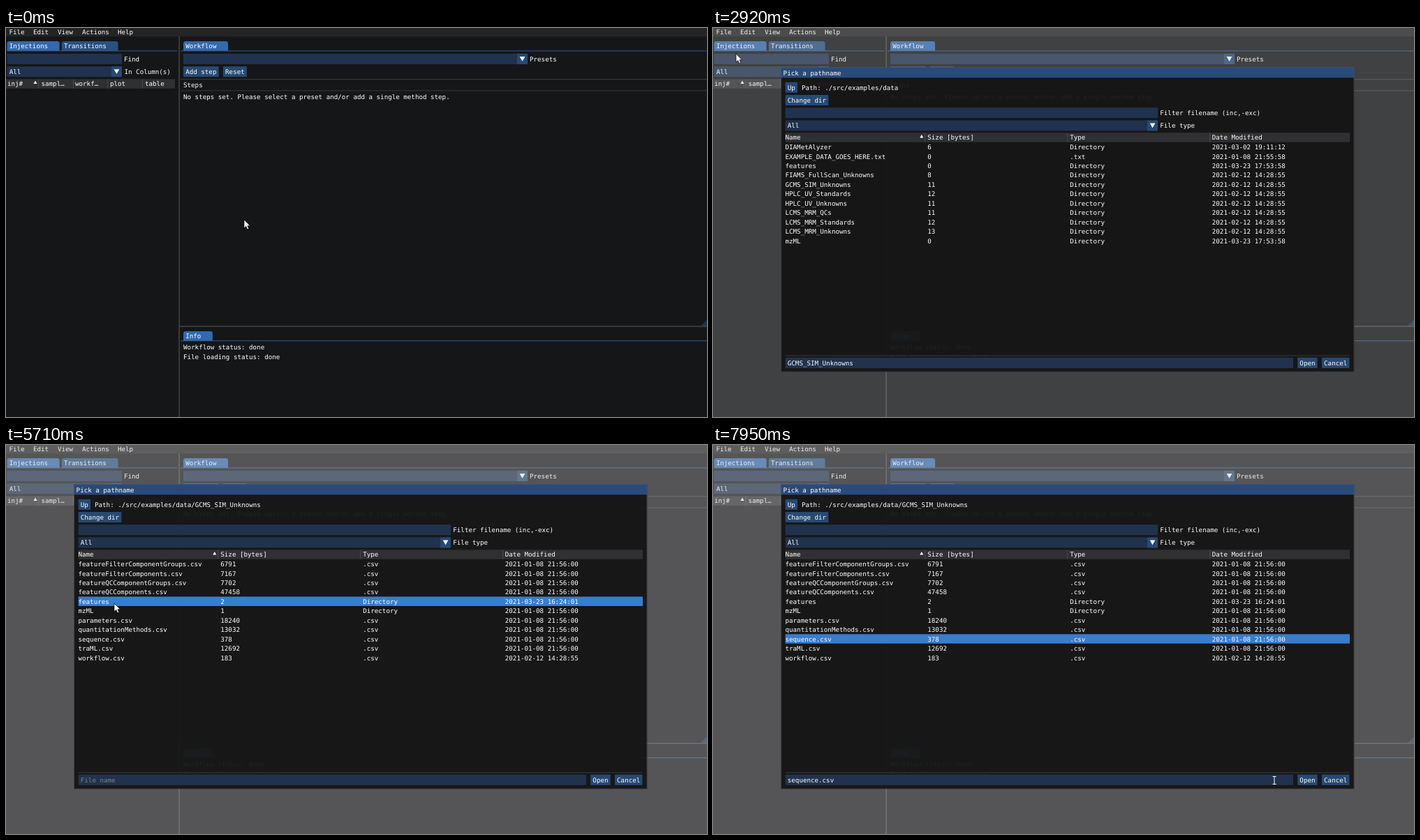
Animation, 1004 px wide and 558 px high, one loop 8 s. Source, as an HTML page:

```html
<!DOCTYPE html>
<html lang="en">
<head>
<meta charset="utf-8">
<title>Pick a pathname</title>
<style>
  html, body { margin: 0; width: 100%; height: 100%; overflow: hidden; background: #151618; }
  svg { display: block; width: 1004px; height: 558px; }
  text {
    font: 9.2px "DejaVu Sans Mono", "Liberation Mono", monospace;
    fill: #fff; white-space: pre; text-rendering: geometricPrecision;
  }
  .muted { fill: #808080; }
  .bar { fill: #242424; }
  .line { fill: #434348; }
  .rule { fill: #434348; }
  .tab, .edge { fill: #3369ad; }
  .tab-off { fill: #2a5083; }
  .field { fill: #20324d; }
  .button { fill: #274972; }
  .head { fill: #303033; }
  .split { fill: #4f4f59; }
  .hot { fill: #397dcd; }
  .press { fill: #4296fa; }
  .title { fill: #294a7a; }
  .popup { fill: #141414; fill-opacity: .94; }
  .border { fill: none; stroke: #6e6e80; stroke-opacity: .5; stroke-width: .8; }
  .mark { fill: #fff; }
  .grip { fill: #1b3250; }
  .pointer { fill: #fff; stroke: #000; stroke-width: .7; }
  .beam { fill: none; stroke: #fff; }
</style>
</head>
<body>
<svg id="stage" viewBox="0 0 1004 558"></svg>
<script>
const LOOP = 8000;
const DIALOG_AT = 2840, ENTER_AT = 5710, CHOSEN_AT = 7490, CHOSEN_ROW = 8, BEAM_AT = 7950;

// The interface is laid out on whole units that are shown scaled down.
const UNIT = .791;
const CHAR = 7 * UNIT, PAD = 4 * UNIT, FRAME = 19 * UNIT, ROW = 17 * UNIT;
const LEFT = 131 * UNIT, RIGHT = 1153 * UNIT, ROW_TOP = 207 * UNIT;

// Markup helpers; text is placed by its left edge and visual middle.
const text = (x, y, s, cls = '') => `<text x="${x}" y="${y + 3.3}" class="${cls}">${s}</text>`;
const rect = (x, y, w, h, cls, extra = '') =>
  `<rect x="${x}" y="${y}" width="${w}" height="${h}" class="${cls}" ${extra}/>`;
const path = (d, cls) => `<path d="${d}" class="${cls}"/>`;
const rule = (x, y, w, cls = 'rule') => rect(x, y, w, UNIT, cls);
const during = (from, to, ...parts) => `<g data-from="${from}" data-to="${to}">${parts.join('')}</g>`;
const sortMark = (x, y) => path(`M${x} ${y}l2.5 4.4h-5z`, 'mark');
const subMark = y => path(`M158.8 ${y - 3.6}v7.2l6.2-3.6z`, 'mark');
const field = (x, y, w) => rect(x, y, w, FRAME, 'field');

function tab(x, y, label, cls = 'tab') {
  const w = label.length * CHAR + 25 * UNIT;
  return path(`M${x} ${y + 13.7}v-10.5q0-3.2 3.2-3.2h${w - 6.4}q3.2 0 3.2 3.2v10.5z`, cls) +
    text(x + PAD, y + 7, label);
}

const button = (x, y, label) =>
  rect(x, y, label.length * CHAR + 2 * PAD, FRAME, 'button') + text(x + PAD, y + 7.6, label);

const combo = (x, y, w, label = '') =>
  field(x, y, w) + rect(x + w - FRAME, y, FRAME, FRAME, 'button') +
  path(`M${x + w - 11.4} ${y + 4.2}h7.8l-3.9 6.7z`, 'mark') + text(x + PAD, y + 7.4, label);

function header(x, y, w, labels, splits) {
  return rect(x, y, w, ROW, 'head') +
    splits.map(s => rect(s, y, UNIT, ROW, 'split')).join('') +
    labels.map(([tx, s]) => text(tx, y + 6.8, s)).join('');
}

function listing(rows) {
  const columns = [103.5, 307.3, 511.2, 714.8];
  return rows.map((row, i) =>
    row.map((s, c) => text(columns[c], ROW_TOP + 7.1 + i * ROW, s)).join('')).join('');
}

const FEB = '2021-02-12 14:28:55', JAN = '2021-01-08 21:56:00', MAR = '2021-03-23 17:53:58';
const folder = (name, size, date = FEB) => [name, size, 'Directory', date];
const csv = (name, size, date = JAN) => [name + '.csv', size, '.csv', date];

const dataDir = [
  folder('DIAMetAlyzer', 6, '2021-03-02 19:11:12'),
  ['EXAMPLE_DATA_GOES_HERE.txt', 0, '.txt', '2021-01-08 21:55:58'],
  folder('features', 0, MAR),
  folder('FIAMS_FullScan_Unknowns', 8),
  folder('GCMS_SIM_Unknowns', 11),
  folder('HPLC_UV_Standards', 12),
  folder('HPLC_UV_Unknowns', 11),
  folder('LCMS_MRM_QCs', 11),
  folder('LCMS_MRM_Standards', 12),
  folder('LCMS_MRM_Unknowns', 13),
  folder('mzML', 0, MAR)
];
const sampleDir = [
  csv('featureFilterComponentGroups', 6791),
  csv('featureFilterComponents', 7167),
  csv('featureQCComponentGroups', 7702),
  csv('featureQCComponents', 47458),
  folder('features', 2, '2021-03-23 16:24:01'),
  folder('mzML', 1, JAN),
  csv('parameters', 18240),
  csv('quantitationMethods', 13032),
  csv('sequence', 378),
  csv('traML', 12692),
  csv('workflow', 183, FEB)
];

const menuBar = [
  rect(0, 0, 1004, 12.3, 'bar'),
  during(1680, 2760, rect(0, 0, 33, 12.3, 'hot')),
  [[4.5, 'File'], [39, 'Edit'], [74, 'View'], [109, 'Actions'], [160, 'Help']]
    .map(([x, s]) => text(x, 6, s)).join('')
].join('');

const leftPanel = [
  tab(1.5, 19, 'Injections'), tab(79.8, 19, 'Transitions', 'tab-off'),
  rule(1.5, 32.5, 243.5, 'edge'),
  field(1.5, 36.9, 164.4), text(169, 44.5, 'Find'),
  combo(1.5, 55.1, 164.4, 'All'), text(169.5, 62.5, 'In Column(s)'),
  header(0, 73.3, 242,
    [[2, 'inj#'], [50.5, 'sampl…'], [99, 'workf…'], [149, 'plot'], [199, 'table']],
    [46.4, 96, 145.4, 195]),
  sortMark(42, 75.5),
  rect(247.3, 12, 2 * UNIT, 546, 'line')
].join('');

const rightPanel = [
  tab(254, 19, 'Workflow'), rule(250, 32.5, 754, 'edge'),
  combo(254, 36.9, 493), text(750, 44.5, 'Presets'),
  button(254, 55.1, 'Add step'), button(310.9, 55.1, 'Reset'),
  rule(250, 73.3, 754), text(254, 82, 'Steps'), rule(250, 89.5, 754),
  text(254, 98.5, 'No steps set. Please select a preset and/or add a single method step.'),
  path('M1004 418.5v8.5h-9z', 'grip'),
  rect(249, 427.2, 755, 2 * UNIT, 'line'),
  tab(254, 435, 'Info'), rule(250, 448.4, 754, 'edge'),
  text(254, 458, 'Workflow status: done'), text(254, 471.5, 'File loading status: done')
].join('');

const fileMenu = during(1840, 2760,
  rect(0, 13, 172, 79, 'popup'), path('M0 13.4H171.6V91.6H0', 'border'),
  during(2460, 2760, rect(1, 31.8, 170, ROW, 'hot')),
  text(4, 25, 'Session', 'muted'), text(4, 38.5, 'Load session from sequence'),
  rule(0, 46, 171),
  text(4, 55, 'Text file', 'muted'),
  text(4, 68.5, 'Import File'), subMark(67.7),
  text(4, 82, 'Export File'), subMark(81.2));

const dialog = during(DIALOG_AT, LOOP,
  rect(97.3, 56.3, 821.1, 437.2, 'popup'), rect(97.3, 56.3, 821.1, FRAME, 'title'),
  path('M97.7 56.7H918V493.1H97.7Z', 'border'),
  text(100.6, 64.3, 'Pick a pathname'),
  button(LEFT, 77.8, 'Up'),
  during(0, ENTER_AT, text(127, 85.5, 'Path: ./src/examples/data')),
  during(ENTER_AT, LOOP, text(127, 85.5, 'Path: ./src/examples/data/GCMS_SIM_Unknowns')),
  button(LEFT, 96, 'Change dir'),
  field(LEFT, 114.2, 533.4), text(640.3, 121.8, 'Filter filename (inc,-exc)'),
  combo(LEFT, 132.4, 533.4, 'All'), text(640.3, 140, 'File type'),
  header(LEFT, ROW_TOP - ROW, RIGHT - LEFT,
    [[103.5, 'Name'], [307.3, 'Size [bytes]'], [511.2, 'Type'], [714.8, 'Date Modified']],
    [303.4, 507.4, 711.4]),
  sortMark(298.8, 153),
  rect(LEFT, ROW_TOP, RIGHT - LEFT, ROW, 'hot', 'id="hover"'),
  during(0, ENTER_AT, listing(dataDir)),
  during(ENTER_AT, LOOP, listing(sampleDir)),
  rule(LEFT, 469.6, RIGHT - LEFT),
  field(LEFT, 472.8, 727.4),
  during(0, ENTER_AT, text(106.8, 480.5, 'GCMS_SIM_Unknowns')),
  during(ENTER_AT, CHOSEN_AT, text(106.8, 480.5, 'File name', 'muted')),
  during(CHOSEN_AT, LOOP, text(106.8, 480.5, 'sequence.csv')),
  button(837.2, 472.8, 'Open'), button(871.9, 472.8, 'Cancel'));

const stage = document.getElementById('stage');
stage.innerHTML = [
  rect(0, 0, 1004, 558, '', 'fill="#151618"'),
  leftPanel, rightPanel, menuBar, fileMenu,
  rect(0, 0, 1004, 558, '', 'id="dim" fill="#ccc"'),
  dialog,
  '<g id="cursor">',
  during(0, BEAM_AT, path('M0 0V12L2.8 9.6 4.8 14 6.8 13.1 5 8.8H8.6Z', 'pointer')),
  during(BEAM_AT, LOOP, path('M-2.5-5.5h5M0-5.5v11M-2.5 5.5h5', 'beam')),
  '</g>'
].join('');

const smooth = p => p * p * (3 - 2 * p);
const easeIn = p => p * p;
const easeOut = p => 1 - (1 - p) * (1 - p);

// First change, last change, number of changes, end point, easing.
const moves = [
  [530, 530, 1, 332, 266, smooth],
  [680, 990, 5, 156, 99, smooth],
  [1220, 1760, 8, 18, 6, smooth],
  [2080, 2230, 3, 22, 12, easeIn],
  [2310, 2610, 5, 33, 37, easeOut],
  [3930, 4390, 7, 132, 214, smooth],
  [4470, 4710, 4, 153, 227, easeOut],
  [4800, 4870, 2, 155, 227, smooth],
  [6340, 6800, 7, 147, 286, smooth],
  [7100, 7180, 2, 147, 281, smooth],
  [7720, 7950, 4, 804, 481, smooth]
];
const presses = [[5480, 5560], [5630, 5710], [7410, 7490]];

function pointerAt(t) {
  let x = 341, y = 275;
  for (const [from, to, count, endX, endY, ease] of moves) {
    if (t < from) break;
    const gap = (to - from) / (count - 1) || 1;
    // A few ms of slack absorb the rounding of the change times.
    const step = t >= to ? count : Math.min(count, Math.floor((t - from + 8) / gap) + 1);
    const p = ease(step / count);
    x += (endX - x) * p;
    y += (endY - y) * p;
  }
  return [x, y];
}

function rowAt(t, x, y) {
  if (t >= CHOSEN_AT) return CHOSEN_ROW;
  const row = Math.floor((y - ROW_TOP) / ROW);
  return t >= DIALOG_AT && x >= LEFT && x < RIGHT && row >= 0 && row < 11 ? row : -1;
}

const cursor = document.getElementById('cursor');
const hover = document.getElementById('hover');
const dim = document.getElementById('dim');
const timed = [...stage.querySelectorAll('[data-from]')]
  .map(el => ({ el, from: +el.dataset.from, to: +el.dataset.to }));

function draw(now) {
  const t = now % LOOP;
  for (const { el, from, to } of timed) el.style.display = t >= from && t < to ? '' : 'none';
  dim.style.opacity = t < 2920 ? 0 : t < 3000 ? .235 : .35;

  const [x, y] = pointerAt(t);
  cursor.setAttribute('transform', `translate(${x.toFixed(1)} ${y.toFixed(1)})`);

  const row = rowAt(t, x, y);
  hover.style.display = row < 0 ? 'none' : '';
  hover.setAttribute('y', ROW_TOP + Math.max(row, 0) * ROW);
  hover.setAttribute('class', presses.some(([a, b]) => t >= a && t < b) ? 'press' : 'hot');
}

const start = performance.now();
function tick() {
  draw(performance.now() - start);
  requestAnimationFrame(tick);
}
tick();
</script>
</body>
</html>
```
